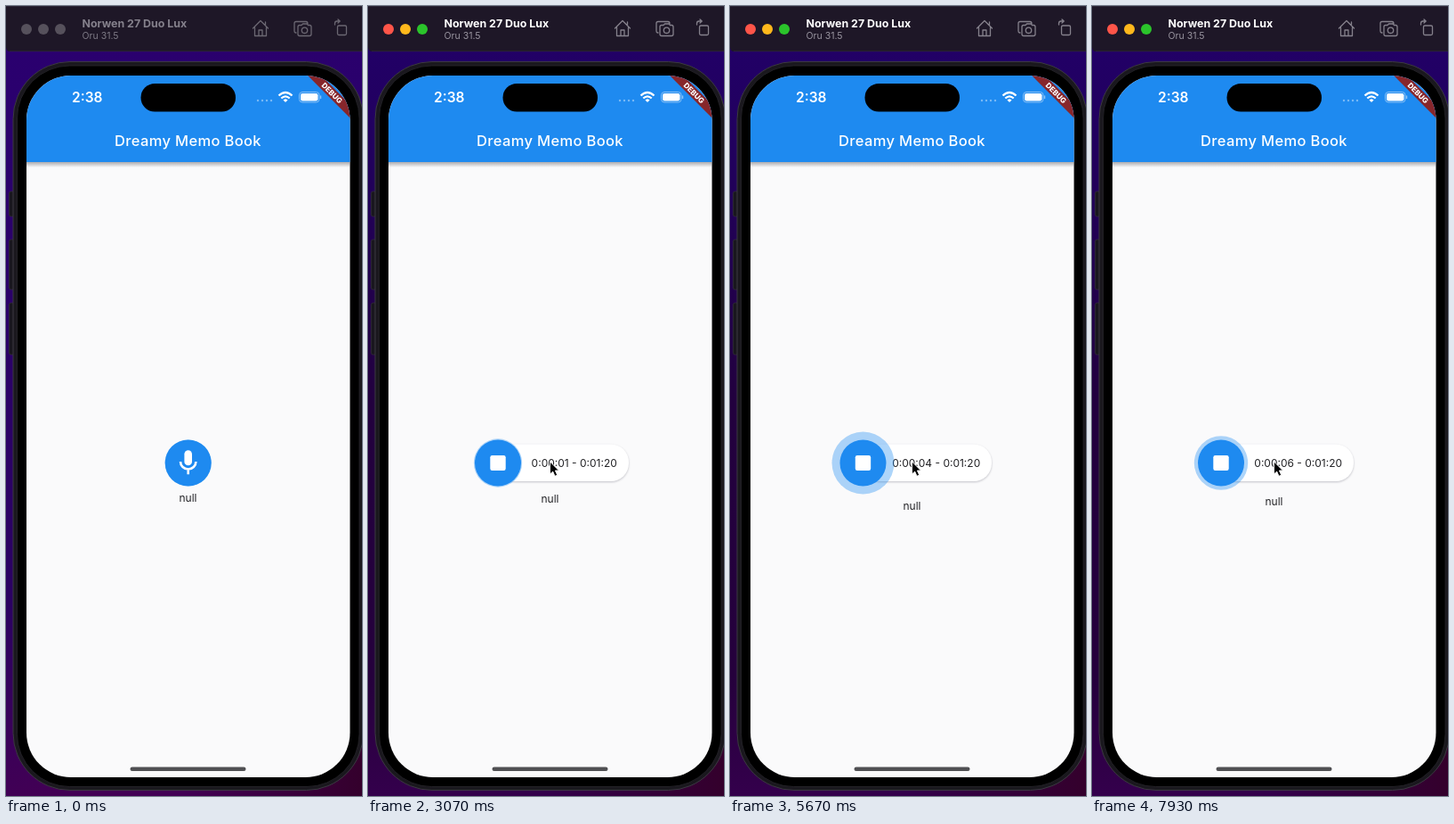
An HTML page for the animation above (8 s loop, 400 by 886 pixels).

```html
<!DOCTYPE html>
<html lang="en">
<head>
<meta charset="utf-8">
<title>Voice recorder</title>
<style>
  html, body { margin: 0; width: 100%; height: 100%; overflow: hidden; background: #1c0038; }
  svg { display: block; width: 100%; height: 100%; font-family: Inter, Roboto, sans-serif; }
  #toolIcons { fill: none; stroke: #6b6772; stroke-width: 1.3; stroke-linejoin: round; stroke-linecap: round; }
  .active #toolIcons { stroke: #85818c; }
  #title { fill: #85818c; font-weight: 700; font-size: 12.4px; }
  #subtitle { fill: #7d7985; font-size: 10.5px; }
  .active #title { fill: #fff; }
  .active #subtitle { fill: #98949f; }
  #lights circle { fill: #56515c; }
  .active #lights circle:nth-child(1) { fill: #ff5549; }
  .active #lights circle:nth-child(2) { fill: #ffb81c; }
  .active #lights circle:nth-child(3) { fill: #2bc42b; }
  .activeWall { opacity: 0; }
  .active .activeWall { opacity: 1; }
  #pill { fill: #fff; filter: drop-shadow(0 1px 1px #c2c2c8); }
  .label { font-size: 12px; fill: #222225; text-anchor: middle; }
</style>
</head>
<body>
<svg id="stage" viewBox="0 0 400 886" preserveAspectRatio="none">
  <defs>
    <linearGradient id="idleWall" x2=".12" y2="1">
      <stop stop-color="#2a0070"/><stop offset=".75" stop-color="#2b0062"/>
      <stop offset="1" stop-color="#420054"/>
    </linearGradient>
    <linearGradient id="liveWall" x2="0" y2="1">
      <stop stop-color="#22006a"/><stop offset=".2" stop-color="#21005c"/>
      <stop offset=".5" stop-color="#22003e"/><stop offset=".85" stop-color="#25003c"/>
      <stop offset="1" stop-color="#34004c"/>
    </linearGradient>
    <linearGradient id="redSide">
      <stop offset=".5" stop-color="#34002c" stop-opacity="0"/><stop offset="1" stop-color="#34002c"/>
    </linearGradient>
    <linearGradient id="barShadow" x2="0" y2="1">
      <stop stop-color="#77777c" stop-opacity=".6"/><stop offset="1" stop-color="#77777c" stop-opacity="0"/>
    </linearGradient>
    <clipPath id="screen"><rect x="23" y="78" width="363.5" height="787" rx="50"/></clipPath>
  </defs>

  <rect width="400" height="886" fill="url(#idleWall)"/>
  <rect class="activeWall" width="400" height="886" fill="url(#liveWall)"/>
  <rect y="800" width="400" height="86" fill="url(#redSide)"/>

  <path d="M0 0H400V51H5Q0 51 0 46Z" fill="#1e1727"/>
  <path d="M0 .5H400M4 50.7H400" stroke="#332c3d" opacity=".7"/>
  <g id="lights"><circle cx="23" cy="26" r="6"/><circle cx="42" cy="26" r="6"/><circle cx="61" cy="26" r="6"/></g>
  <text id="title" x="85.5" y="24">Norwen 27 Duo Lux</text>
  <text id="subtitle" x="85.5" y="37.3">Oru 31.5</text>
  <g id="toolIcons">
    <path d="M277.5 25 286 16.5 294.5 25M279.5 23.5V33.5H292.5V23.5M284 33.5V27H288V33.5M291.5 18V21"/>
    <path d="M326 30H325.5Q324 30 324 28V19.5Q324 17.5 326 17.5H337Q339 17.5 339 20M330 21.5H332L333.5 20H338L339.5 21.5H341Q343 21.5 343 23.5V31.5Q343 33.5 341 33.5H330Q328 33.5 328 31.5V23.5Q328 21.5 330 21.5Z"/>
    <circle cx="335.5" cy="27.3" r="3.2"/>
    <path d="M374 22H381Q382.5 22 382.5 23.5V31Q382.5 32.5 381 32.5H374Q372.5 32.5 372.5 31V23.5Q372.5 22 374 22ZM369.5 21V19.5Q369.5 17 372 17H375M373 15 375.2 17 373 19"/>
  </g>

  <g fill="#19171e" stroke="#34313a" stroke-width=".7">
    <rect x="3.5" y="208" width="7" height="28" rx="2"/>
    <rect x="3.5" y="262" width="7" height="56" rx="2"/>
    <rect x="3.5" y="333" width="7" height="58" rx="2"/>
  </g>
  <rect x="8" y="62.5" width="393.5" height="817" rx="64" fill="#1a181e" stroke="#3c3942"/>
  <rect x="12.5" y="67" width="384.5" height="808.5" rx="59" fill="#000" stroke="#29272d" stroke-width=".8"/>

  <g clip-path="url(#screen)">
    <rect x="23" y="78" width="364" height="787" fill="#fafafb"/>
    <rect x="23" y="175" width="364" height="6" fill="url(#barShadow)"/>
    <rect x="23" y="78" width="364" height="97" fill="#1e8af0"/>
    <g transform="translate(366.3 97.7) rotate(45)">
      <rect x="-40" y="-5.3" width="80" height="10.6" fill="#87262b"/>
      <text y="3" font-size="8.3" font-weight="800" fill="#fff" text-anchor="middle">DEBUG</text>
    </g>
  </g>
  <rect x="151.5" y="87" width="106.5" height="31.5" rx="15.75"/>
  <text x="91.3" y="108" font-size="15.5" font-weight="600" fill="#fff" text-anchor="middle">2:38</text>
  <path d="M283 106H299" stroke="#78b9f6" stroke-width="2.4" stroke-linecap="round" stroke-dasharray="0 5"/>
  <g fill="none" stroke="#fff" stroke-width="2.3">
    <path d="M306.5 100.5Q314 93.5 321.5 100.5M309.3 103.5Q314 99.2 318.7 103.5"/>
    <path d="M312 105.5Q314 104 316 105.5L314 107.5Z" fill="#fff" stroke-width="1"/>
  </g>
  <rect x="329.5" y="96.5" width="22.5" height="11.5" rx="3.5" fill="none" stroke="#86c0f7"/>
  <rect x="331" y="98" width="19.5" height="8.5" rx="2.3" fill="#fff"/>
  <path d="M353.5 100.5V104" stroke="#86c0f7" stroke-width="1.5"/>
  <text x="204.5" y="157" font-size="16.5" font-weight="500" letter-spacing=".35" fill="#fff" text-anchor="middle">Dreamy Memo Book</text>
  <rect x="139.5" y="853.5" width="130" height="4.5" rx="2.25" fill="#505053"/>

  <rect id="pill" y="491.5" height="41.5" rx="20"/>
  <text id="timer" class="label" x="231.7" y="516.8"></text>
  <g id="button">
    <circle id="halo" fill="#1e8af0" opacity=".36"/>
    <circle r="26" fill="#1e8af0"/>
    <g id="mic" fill="none" stroke="#fff" stroke-width="2.6">
      <rect x="-4.3" y="-14.2" width="8.6" height="17" rx="4.3" fill="#fff" stroke="none"/>
      <path d="M-8.7 -1.4A8.7 8.4 0 0 0 8.7 -1.4M0 7V12.8"/>
    </g>
    <rect id="stop" x="-8.7" y="-8.5" width="17.4" height="17" rx="2.2" fill="#fff"/>
  </g>
  <text id="status" class="label" x="204.5">null</text>
  <path id="cursor" d="M0 0V14L3.2 11.1 5.5 16.3 8.2 15.1 5.9 10H10Z" fill="#000" stroke="#fff" stroke-width=".9"/>
</svg>
<script>
const LOOP = 8000, ENTER = 870, ACTIVATE = 1600, RECORD = 1610, MIDDLE = 512.5;
const parts = Object.fromEntries([...document.querySelectorAll('[id]')].map(el => [el.id, el]));

// [time, value] tables, eased between rows
const haloSteps = [[2000, 26], [2520, 34], [3040, 27], [3500, 37], [4020, 29], [4500, 37],
  [5020, 29], [5500, 37], [6020, 29], [6520, 37], [6960, 30], [7430, 47], [LOOP, 29.5]];
const cursorX = [[ENTER, 250], [1400, 204.5]];
const cursorY = [[ENTER, 880], [1400, 511]];
const expansion = [[RECORD, 0], [RECORD + 300, 1]];

const smooth = p => p * p * (3 - 2 * p);
const mix = (a, b, p) => a + (b - a) * p;

function at(steps, t) {
  const next = steps.findIndex(step => step[0] > t);
  if (next === 0) return steps[0][1];
  if (next < 0) return steps.at(-1)[1];
  const [t0, a] = steps[next - 1], [t1, b] = steps[next];
  return mix(a, b, smooth((t - t0) / (t1 - t0)));
}

function set(id, attributes) {
  for (const [name, value] of Object.entries(attributes)) parts[id].setAttribute(name, value);
}

function draw(t) {
  const open = at(expansion, t);
  const radius = at(haloSteps, t);
  const seconds = Math.max(0, Math.floor((t - RECORD) / 1000));
  // The digit 1 is narrower, which pulls in both ends of the row.
  const inset = seconds === 1 ? 1 : 0;
  const center = mix(204.7, 114.5 + inset + Math.max(radius, 30.5), open);
  const right = mix(210, 294 - inset, open);

  parts.stage.classList.toggle('active', t >= ACTIVATE);
  set('button', { transform: `translate(${center} ${MIDDLE})` });
  set('halo', { r: radius });
  set('mic', { opacity: 1 - open });
  set('stop', { opacity: open });
  set('pill', { x: center, width: right - center, opacity: open > 0 ? 1 : 0 });
  set('timer', { opacity: Math.max(0, open * 2 - 1) });
  parts.timer.textContent = `0:00:0${seconds} - 0:01:20`;
  set('status', { y: MIDDLE + radius + 17.5 });
  set('cursor', {
    transform: `translate(${at(cursorX, t)} ${at(cursorY, t)})`,
    opacity: t >= ENTER ? 1 : 0
  });
}

function frame() {
  draw(performance.now() % LOOP);
  requestAnimationFrame(frame);
}
frame();
</script>
</body>
</html>
```
